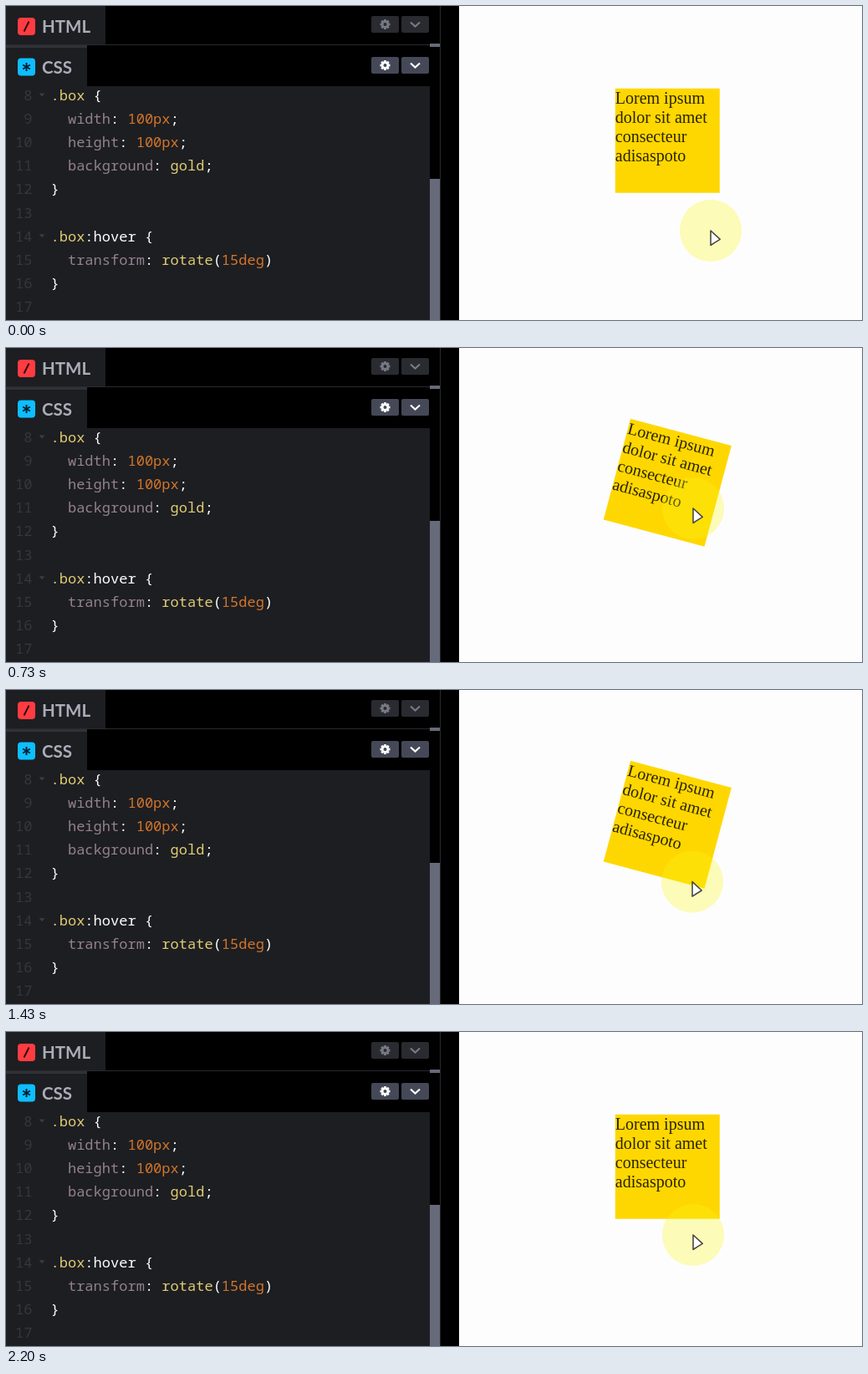
An HTML page with a canvas for the animation above (2.23 s loop, 1024 by 376 pixels).

```html
<!DOCTYPE html>
<html lang="en">
<head>
<meta charset="utf-8">
<title>Hover rotation</title>
<style>
  html, body { margin: 0; width: 100%; height: 100%; overflow: hidden; background: #000; }
  canvas { display: block; width: 1024px; height: 376px; }
</style>
</head>
<body>
<canvas id="stage" width="1024" height="376"></canvas>
<script>
const W = 1024, H = 376, LOOP = 2230;
const MONO = '17.05px "Noto Sans Mono", "DejaVu Sans Mono", monospace';
const PANEL = '#1d1e22', EDGE = '#292a2f', THUMB = '#666a7a';
const INK = { sel: '#e0cc72', prop: '#93808f', num: '#d2752a', punct: '#ffffff' };
const ctx = document.getElementById('stage').getContext('2d');

// Pointer path: time, x, y
const path = [
  [0, 843, 269], [30, 843, 270], [200, 843, 283], [430, 843, 283],
  [500, 842, 260], [620, 834, 221], [733, 822, 192], [790, 821, 188],
  [1133, 821, 240], [1250, 821, 252], [1600, 821, 204], [1660, 821, 201],
  [1933, 821, 236], [2080, 822, 252], [2200, 822, 243]
];
const hovers = [[600, 1095], [1425, 1965]];

// Code lines as [colour, text] runs; the first is number 8
const code = [
  [['sel', '.box'], ['punct', ' {']],
  [['prop', '  width'], ['punct', ': '], ['num', '100px'], ['punct', ';']],
  [['prop', '  height'], ['punct', ': '], ['num', '100px'], ['punct', ';']],
  [['prop', '  background'], ['punct', ': '], ['sel', 'gold'], ['punct', ';']],
  [['punct', '}']],
  [],
  [['sel', '.box'], ['punct', ':hover {']],
  [['prop', '  transform'], ['punct', ': '], ['sel', 'rotate'], ['punct', '('],
    ['num', '15deg'], ['punct', ')']],
  [['punct', '}']],
  []
];

function slope(i, k) {
  return (path[i + 1][k] - path[i][k]) / (path[i + 1][0] - path[i][0]);
}

// Monotone tangent: flat at ends and turning points
function tangent(i, k) {
  if (i === 0 || i === path.length - 1) return 0;
  const a = slope(i - 1, k), b = slope(i, k);
  return a * b <= 0 ? 0 : 2 * a * b / (a + b);
}

function pointer(t) {
  let i = 0;
  while (i < path.length - 2 && t > path[i + 1][0]) i++;
  const span = path[i + 1][0] - path[i][0];
  const u = Math.min(1, (t - path[i][0]) / span);
  const e = u * u * (3 - 2 * u);
  return [1, 2].map(k =>
    path[i][k] * (1 - e) + path[i + 1][k] * e +
    span * u * (1 - u) * ((1 - u) * tangent(i, k) - u * tangent(i + 1, k)));
}

function rect(c, x, y, w, h, color, r = 0) {
  c.fillStyle = color;
  c.beginPath();
  c.roundRect(x, y, w, h, r);
  c.fill();
}

function disc(c, x, y, r, color) {
  c.fillStyle = color;
  c.beginPath();
  c.arc(x, y, r, 0, 2 * Math.PI);
  c.fill();
}

function text(c, str, x, y, color, font, align = 'left') {
  c.font = font;
  c.textAlign = align;
  c.fillStyle = color;
  c.fillText(str, x, y);
}

function line(c, points, color, width) {
  c.strokeStyle = color;
  c.lineWidth = width;
  c.beginPath();
  points.forEach(p => c.lineTo(...p));
  c.stroke();
}

// Evenly turned strokes through one centre
function spokes(c, x, y, count, r, color, width) {
  for (let i = 0; i < count; i++) {
    const a = Math.PI / 2 + i * Math.PI / count;
    const dx = r * Math.cos(a), dy = r * Math.sin(a);
    line(c, [[x - dx, y - dy], [x + dx, y + dy]], color, width);
  }
}

function buttons(c, y, bg, fg) {
  rect(c, 437, y, 33, 20, bg, 2);
  rect(c, 473, y, 33, 20, bg, 2);
  spokes(c, 453.5, y + 10, 4, 6, fg, 2.8);
  disc(c, 453.5, y + 10, 4.7, fg);
  disc(c, 453.5, y + 10, 2, bg);
  line(c, [[484, y + 7.5], [489.5, y + 12.5], [495, y + 7.5]], fg, 2.2);
}

function header(c, title, y, color) {
  rect(c, 14, y - 10.5, 21, 21, color, 4);
  text(c, title, 43, y + 7.5, '#aaaeb8', 'bold 20.5px Lato, sans-serif');
}

function drawEditor(c) {
  rect(c, 0, 0, 542, H, '#000');
  rect(c, 0, 0, 119, 46, PANEL);
  rect(c, 0, 46, 519, 1, EDGE);
  rect(c, 0, 47, 97, 49, PANEL);
  rect(c, 0, 47, 97, 3, '#303238');
  rect(c, 0, 96, 507, 280, PANEL);
  rect(c, 519, 0, 1, H, EDGE);
  rect(c, 507, 45, 12, 4, THUMB);
  rect(c, 507, 207, 12, 169, THUMB);

  header(c, 'HTML', 24.5, '#ff3c41');
  line(c, [[21.5, 30.5], [27.5, 18.5]], '#300a0c', 2);
  header(c, 'CSS', 73, '#0ebeff');
  spokes(c, 24.5, 73, 3, 5, '#002030', 1.9);
  buttons(c, 12, '#2a2b31', '#777a84');
  buttons(c, 61, '#444857', '#ffffff');

  code.forEach((runs, i) => {
    const y = 113 + i * 28.12;
    let x = 53.5;
    text(c, String(i + 8), 31.5, y, '#35373d', MONO, 'right');
    for (const [ink, str] of runs) {
      text(c, str, x, y, INK[ink], MONO);
      x += c.measureText(str).width;
    }
    const opens = runs.some(run => run[1].endsWith('{'));
    if (opens) {
      c.fillStyle = '#3a3c42';
      c.beginPath();
      c.moveTo(39.5, y - 8.5);
      c.lineTo(46.5, y - 8.5);
      c.lineTo(43, y - 4.5);
      c.fill();
    }
  });
}

function drawBox(hover) {
  ctx.save();
  ctx.translate(791.3, 161.2);
  if (hover) ctx.rotate(Math.PI / 12);
  rect(ctx, -62.5, -62.5, 125, 125, '#ffd700');
  ['Lorem ipsum', 'dolor sit amet', 'consecteur', 'adisaspoto'].forEach((s, i) =>
    text(ctx, s, -62.5, -44.3 + i * 23, '#2a2300', '20px "Liberation Serif", serif'));
  ctx.restore();
}

function drawPointer(x, y) {
  disc(ctx, x, y, 37, 'rgba(248, 246, 20, .3)');
  ctx.save();
  ctx.translate(x, y);
  ctx.beginPath();
  [[0, 0], [0, 17.5], [4.8, 14.4], [11.2, 10.4]].forEach(p => ctx.lineTo(...p));
  ctx.closePath();
  ctx.lineJoin = 'round';
  ctx.lineWidth = 1.6;
  ctx.strokeStyle = '#4a4842';
  ctx.fillStyle = '#fff';
  ctx.fill();
  ctx.stroke();
  ctx.restore();
}

const editor = document.createElement('canvas');
editor.width = 542;
editor.height = H;
drawEditor(editor.getContext('2d'));

const start = performance.now();

function frame() {
  const now = (performance.now() - start) % LOOP;
  // Motion steps at 30 pictures per second
  const step = Math.floor((Math.floor(now / 10) * 10 + 4) * 0.03);
  const t = step * 100 / 3;
  rect(ctx, 542, 0, W - 542, H, '#fdfdfd');
  ctx.drawImage(editor, 0, 0);
  drawBox(hovers.some(([a, b]) => t >= a && t < b));
  drawPointer(...pointer(t));
  requestAnimationFrame(frame);
}
frame();
</script>
</body>
</html>
```
